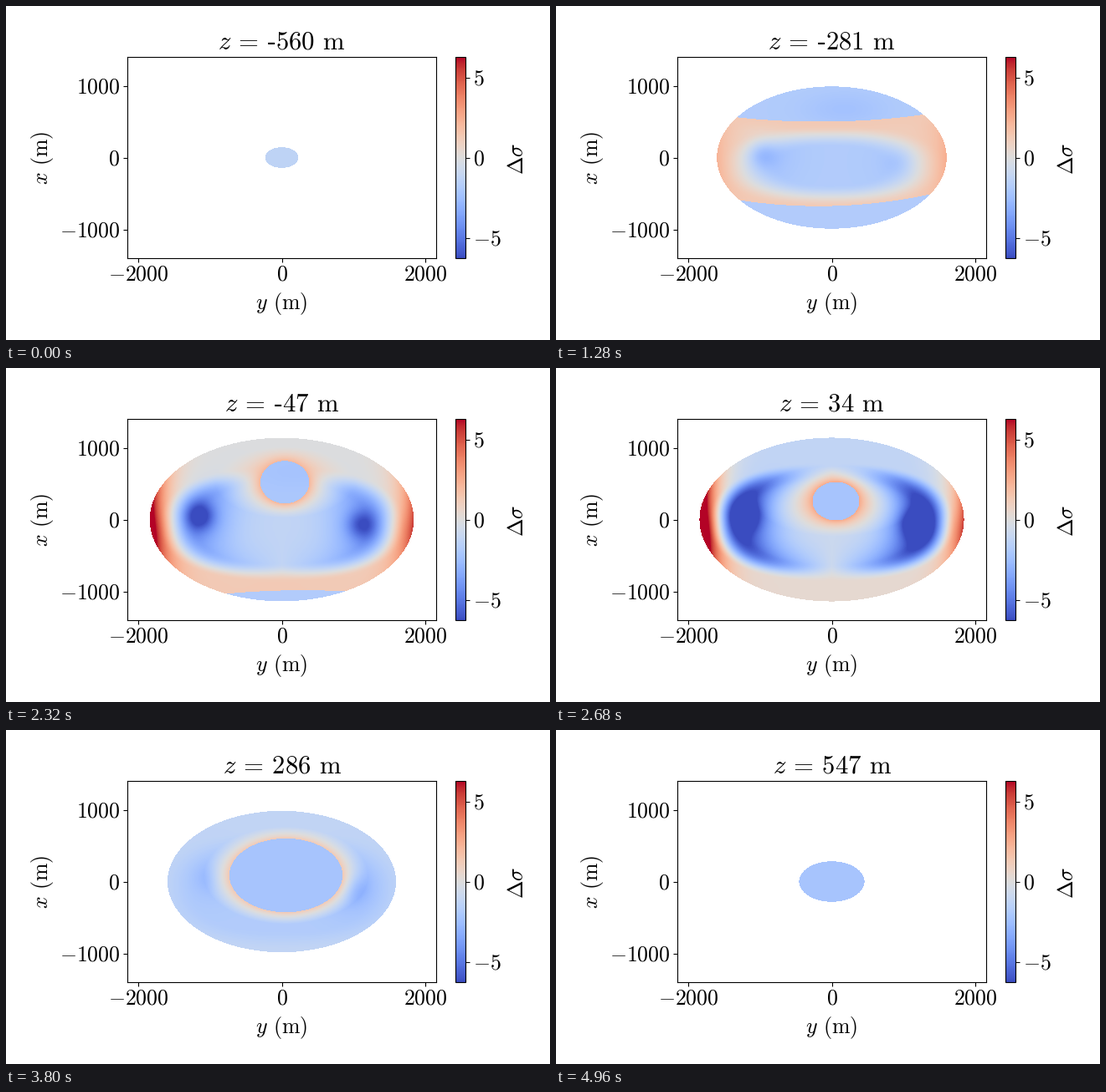
A matplotlib script for the animation above (5000 ms loop, 650 by 400 pixels).

```python
import numpy as np
import matplotlib.pyplot as plt
from matplotlib.animation import FuncAnimation

W, H, DPI = 650, 400, 100
FRAMES, INTERVAL = 125, 40
LEFT, TOP = 145.3, 61.3
COLS, ROWS = 369, 241
RIGHT, BOTTOM = LEFT + COLS, TOP + ROWS
SCALE = 0.0858                      # pixels per metre
SEMI_Y, SEMI_X, SEMI_Z = 158.3, 98.2, 564.5
VMAX = 2 * np.pi
Z_MID = 34                          # depth with the strongest contrast
FONT = 18.6

plt.rcParams["mathtext.fontset"] = "cm"
plt.rcParams["font.family"] = "Liberation Serif"

U, V = np.meshgrid(np.arange(COLS) - (COLS - 1) / 2,
                   np.arange(ROWS) - (ROWS - 1) / 2)


def smoothstep(x, lo, hi):
    t = np.clip((x - lo) / (hi - lo), 0, 1)
    return t * t * (3 - 2 * t)


def bump(x, centre, width):
    return np.exp(-((x - centre) / width) ** 2)


def radius(cx, cy, rx, ry, power=2.0):
    return (np.abs((U - cx) / rx) ** power + np.abs((V - cy) / ry) ** power) ** (1 / power)


def spot(cx, cy, sx, sy):
    return bump(U, cx, sx) * bump(V, cy, sy)


def blob(cx, cy):
    return spot(cx, cy, 17, 17) + 0.5 * spot(cx, cy, 42, 38)


def basin(z, half):
    """Cold core inside a rim, with two deep spots and hot flanks."""
    mid = bump(z, Z_MID, 120)
    grow = smoothstep(z, -300, 0)
    core = -1.9 + 1.1 * mid + 0.6 * smoothstep(abs(z), 200, 500)
    above = 1.2 - 2.4 * smoothstep(z, -137, Z_MID)
    below = 1.3 - 2.5 * smoothstep(z, -60, 178)
    rim = below + (above - below) * (1 + np.tanh(V / 20)) / 2

    r = radius(0, -10 + 7 * mid, 98 + 27 * grow, 36 + 25 * grow ** 2, 2.4)
    inner = core - 8 * mid ** 2 * r ** 2 * np.abs(U) / 110
    soft = 0.38 - 0.2 * grow
    val = inner + (rim - inner) * smoothstep(r, 1 - soft, 1 + soft)

    flank = 1.1 * smoothstep(z, -560, -281)
    flank = flank + np.where(U < 0, 11 * mid, 5 * np.sqrt(mid))
    flank = flank * (1 - smoothstep(z, Z_MID, 150))
    val += flank * np.minimum(np.abs(U) / half, 1) ** 8

    spread = 84 + 18 * bump(z, Z_MID, 150)
    val -= 3 * bump(z, -30, 260) * blob(-spread, 4)
    val -= 3 * bump(z, 70, 260) * blob(spread - 2, -6)
    return val


def add_cap(val, z):
    """Sharp-edged cold cap surrounded by a warm ring."""
    mid = bump(z, Z_MID, 120)
    late = smoothstep(z, -137, Z_MID)
    rise = np.sqrt(max(z - Z_MID, 0) / 144)
    drop = max(Z_MID - z, 0) / 171
    cx = 5 - 6 * drop ** 2
    cy = 22 - 11 * rise + 16 * drop ** 2.5 + 44 * (1 - late)
    rx = 28 + 30 * rise + 24 * drop ** 4
    ry = 23 + 16 * rise + 16 * drop ** 2.5

    q = radius(cx, cy, rx, ry)
    o = radius(cx, cy, rx + 30 + 38 * mid, ry + 14 + 5 * mid)
    gap_in, gap_out = np.maximum(q - 1, 0), np.maximum(1 - o, 0)
    weight = gap_out / (gap_in + gap_out + 1e-9)
    val = val + weight * (1.3 + 1.3 * mid - val)

    cap = -1.8 - 0.4 * late - 0.5 * (1 - late) * spot(15, 58, 50, 20)
    return np.where(q < 1, cap, val)


def add_floor(val, z):
    bend = np.interp(z, (-281, -137), (0.0008, -0.0005))
    edge = -58 - 50 * smoothstep(z, -137, Z_MID) + 0.025 * U + bend * U ** 2
    return np.where(V < edge, -1.8, val)


def field(z):
    shrink = np.sqrt(1 - (z / SEMI_Z) ** 2)
    half = SEMI_Y * shrink
    val = add_floor(add_cap(basin(z, half), z), z)
    return np.where(radius(0, 0, half, SEMI_X * shrink) <= 1, val, np.nan)


def depth(i):
    return -560 + 9 * max(0, i - 1)


def title_text(z):
    sign = "-" if z < 0 else ""
    return (r"$z\hspace{0.18}=\hspace{0.18}$" + sign
            + rf"$\mathrm{{{abs(z)}}}\hspace{{0.38}}\mathrm{{m}}$")


def box(x0, y0, x1, y1):
    return [x0 / W, 1 - y1 / H, (x1 - x0) / W, (y1 - y0) / H]


def label(x, y, text, rotation=0):
    fig.text(x / W, 1 - y / H, text, fontsize=FONT, ha="center", va="baseline",
             rotation=rotation, rotation_mode="anchor")


def set_ticks(axis, values):
    axis.set_ticks(values, labels=[f"${v}$" for v in values])
    axis.set_tick_params(labelsize=FONT, pad=3)


fig = plt.figure(figsize=(W / DPI, H / DPI), dpi=DPI, facecolor="white")
ax = fig.add_axes(box(LEFT, TOP, RIGHT, BOTTOM))
lim_y, lim_x = COLS / 2 / SCALE, ROWS / 2 / SCALE
im = ax.imshow(field(depth(0)), cmap="coolwarm", vmin=-VMAX, vmax=VMAX,
               origin="lower", aspect="auto", interpolation="nearest",
               extent=(-lim_y, lim_y, -lim_x, lim_x))
set_ticks(ax.xaxis, [-2000, 0, 2000])
set_ticks(ax.yaxis, [-1000, 0, 1000])
title = ax.set_title(title_text(depth(0)), fontsize=22.2, pad=7)

cax = fig.add_axes(box(537.2, TOP, 549.3, BOTTOM))
fig.colorbar(im, cax=cax)
set_ticks(cax.yaxis, [-5, 0, 5])

label(329, 362.5, r"$y\hspace{0.38}\mathrm{(m)}$")
label(50.5, 181.5, r"$x\hspace{0.38}\mathrm{(m)}$", 90)
label(618, 183, r"$\Delta\sigma$", 90)


def update(i):
    z = depth(i)
    im.set_data(field(z))
    title.set_text(title_text(z))
    return im, title


anim = FuncAnimation(fig, update, frames=FRAMES, interval=INTERVAL,
                     repeat=True, repeat_delay=0, blit=False)
plt.show()
```
